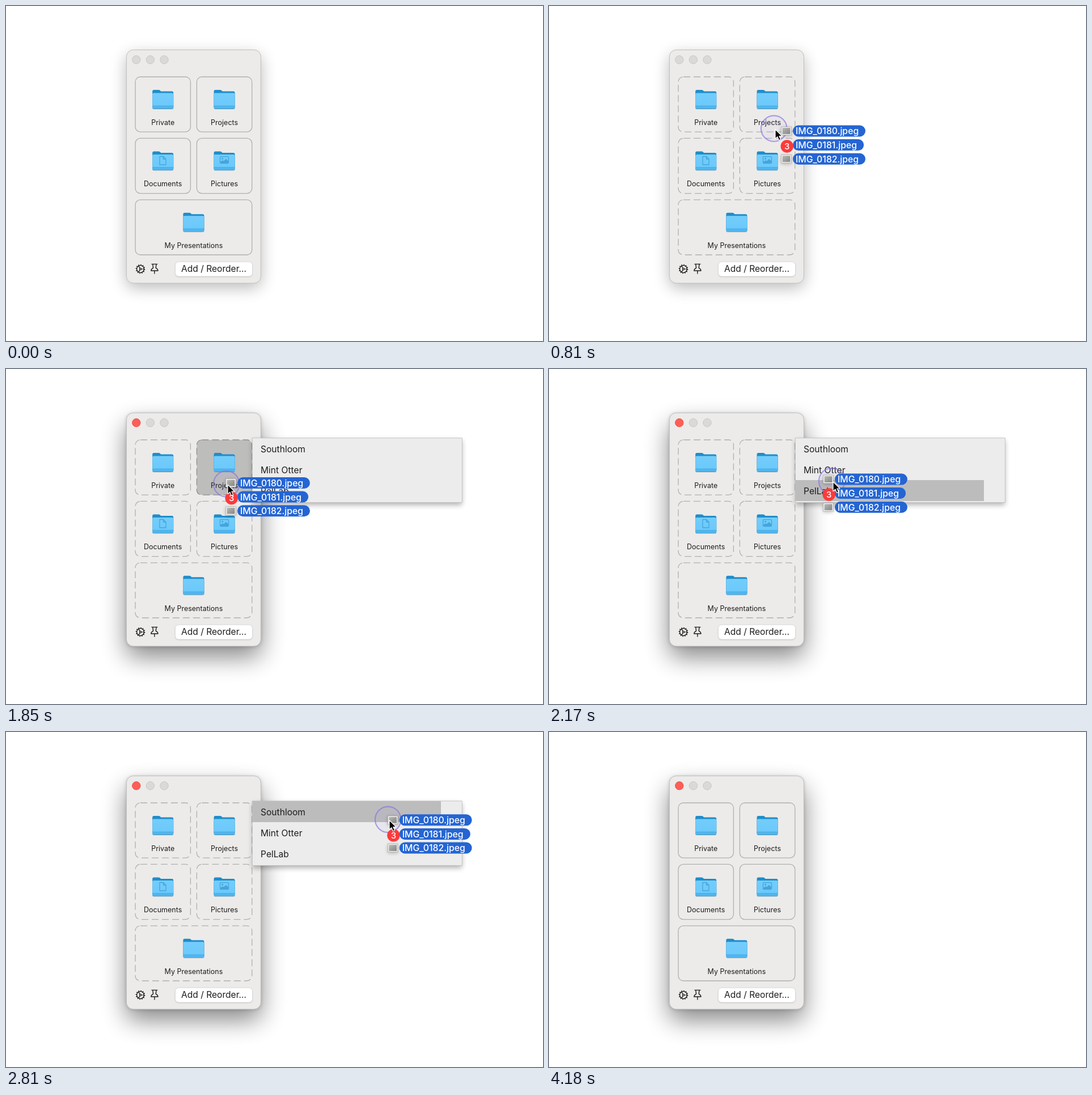
Recreate the animation shown at these times as an HTML page. Size 947 by 591 pixels, loop 7920 ms.

```html
<!DOCTYPE html>
<html lang="en">
<head>
<meta charset="utf-8">
<title>Drag files into a folder panel</title>
<style>
  html, body { margin: 0; width: 100%; height: 100%; overflow: hidden; background: #fff; }
  svg { display: block; width: 100%; height: 100%; }
  text { font-family: Inter, Roboto, "Liberation Sans", sans-serif; fill: #1d1d1d; }
  .cap { font-size: 12.5px; text-anchor: middle; }
  .row { font-size: 15.6px; }
  .file { font-size: 15.8px; font-weight: 500; fill: #fff; }
  .tile { fill: none; stroke: #b0b0af; stroke-width: 1.3; }
  .dashed .tile { stroke-dasharray: 12 6; }
  .line { fill: none; stroke: #1c1c1c; stroke-width: 1.4; stroke-linecap: round; stroke-linejoin: round; }
  .glyph { fill: none; stroke: #45a5da; stroke-width: 1.3; stroke-linejoin: round; }
  .blur-s { filter: blur(3px); }
  .blur-m { filter: blur(14px); }
  .blur-l { filter: blur(22px); }
</style>
</head>
<body>
<svg viewBox="0 0 947 591">
  <defs>
    <linearGradient id="front" x2="0" y2="1">
      <stop offset="0" stop-color="#74cdfb"/>
      <stop offset="1" stop-color="#69c8fb"/>
    </linearGradient>
    <linearGradient id="photo" x2="1" y2="1">
      <stop offset="0" stop-color="#b9b9b6"/>
      <stop offset="1" stop-color="#858583"/>
    </linearGradient>
    <g id="folder">
      <path d="M-18.5 14V-14Q-18.5-16.5-16-16.5H-7.5Q-6-16.5-5-15.5L-3.5-14H16Q18.5-14 18.5-11.5V14Z" fill="#1f8dca"/>
      <rect x="-18.5" y="-10" width="37" height="27.4" rx="2.5" fill="#5b8fac"/>
      <rect x="-18.5" y="-11" width="37" height="27.4" rx="2.5" fill="url(#front)"/>
      <path d="M-18.5 12H18.5V13.9Q18.5 16.4 16 16.4H-16Q-18.5 16.4-18.5 13.9Z" fill="#4fb6ef"/>
      <path d="M-18.5 11.7H18.5" stroke="#47a9df" stroke-width=".9"/>
    </g>
    <g id="thumb">
      <rect x="-9" y="-6" width="18" height="15" fill="#000" opacity=".25" class="blur-s"/>
      <rect x="-8.7" y="-7.2" width="17.4" height="14.4" fill="#fff" stroke="#9c9c9c" stroke-width=".7"/>
      <rect x="-7" y="-5.5" width="14" height="11" fill="url(#photo)"/>
    </g>
  </defs>

  <rect id="restShadow" class="blur-m" x="212" y="86" width="238" height="411" rx="14" opacity=".27"/>
  <g id="liveShadow">
    <rect class="blur-l" x="212" y="98" width="238" height="410" rx="14" opacity=".47"/>
    <rect class="blur-s" x="212" y="78" width="238" height="412" rx="12" opacity=".16"/>
  </g>
  <rect x="212.4" y="77.4" width="237" height="411.6" rx="12" fill="#ecebe9" stroke="#bebebd"/>

  <g fill="#dad9d8" stroke="#c4c3c2" stroke-width=".9">
    <circle id="close" cx="229.8" cy="94.8" r="7.2"/>
    <circle cx="254.4" cy="94.8" r="7.2"/>
    <circle cx="279" cy="94.8" r="7.2"/>
  </g>

  <g id="tiles"></g>

  <path class="glyph" d="M271 265.5H277.5L282 270V280H271ZM277.5 265.5V270H282"/>
  <rect class="glyph" x="377.5" y="265.6" width="15" height="12" rx="1.5"/>
  <circle cx="381.6" cy="269.2" r="1.5" fill="#45a5da"/>
  <path d="M378 277V275L382 272.2L384 273.6L388 269.8L392 273.5V277Z" fill="#45a5da"/>

  <g class="line" transform="translate(237 464)">
    <circle r="6.4"/>
    <circle r="7.5" stroke-width="1.7" stroke-dasharray="1.6 2.327" stroke-linecap="butt"/>
    <circle r="1.6" stroke-width="1.2"/>
    <path d="M1.7 0H6.2M-.8-1.4L-3.1-5.4M-.8 1.4L-3.1 5.4" stroke-width="1.2"/>
  </g>
  <path class="line" d="M257 455.4H266.8M258.8 455.6L259.6 462.2Q256 463.8 255.8 467H268Q267.8 463.8 264.2 462.2L265 455.6M261.9 467V472"/>

  <rect x="298.5" y="452" width="136" height="26" rx="6" opacity=".16" style="filter:blur(1px)"/>
  <rect x="298.5" y="451.3" width="136" height="25.6" rx="6" fill="#fff" stroke="#d5d5d4" stroke-width=".7"/>
  <text x="366.5" y="469" font-size="15.6" text-anchor="middle">Add / Reorder...</text>

  <g id="popup">
    <rect x="435" y="126" width="369" height="114" opacity=".3" style="filter:blur(5px)"/>
    <rect x="434.3" y="121.8" width="370" height="113.6" fill="#ececec" stroke="#bdbdbd" stroke-width=".8"/>
    <rect id="hover" x="434.3" width="332.7" height="37" fill="#bcbcbc"/>
    <text class="row" x="449" y="146.5">Southloom</text>
    <text class="row" x="449" y="183.5">Mint Otter</text>
    <text class="row" x="449" y="220.5">PelLab</text>
  </g>

  <circle id="press" r="22.8" fill="#8d7be8" fill-opacity=".05" stroke="#8672e0" stroke-opacity=".65" stroke-width="2.2"/>
  <g id="files"></g>
  <path id="cursor" d="M0 0V16.6L3.8 13.1L6.6 19.4L9.6 18.1L6.9 12H12Z" fill="#000" stroke="#fff" stroke-width="1.2" stroke-linejoin="round"/>
</svg>
<script>
const LOOP = 7920, STEP = 80;
const MOVE = 330, DROP = 3380;
const el = id => document.getElementById(id);

// label, x, y, width
const tiles = [
  ["Private", 228, 125, 97.4],
  ["Projects", 336.4, 125, 97.4],
  ["Documents", 228, 233.4, 97.4],
  ["Pictures", 336.4, 233.4, 97.4],
  ["My Presentations", 228, 341.8, 205.8]
];
el("tiles").innerHTML = tiles.map(([name, x, y, w]) => `
  <rect class="tile" x="${x}" y="${y}" width="${w}" height="97.2" rx="9"/>
  <use href="#folder" x="${x + w / 2}" y="${y + 39.5}"/>
  <text class="cap" x="${x + w / 2}" y="${y + 85}">${name}</text>`).join("");
const projects = document.querySelectorAll(".tile")[1];

el("files").innerHTML = [0, 1, 2].map(i => `
  ${i === 1 ? "" : `<use href="#thumb" x="-11.5" y="${i * 24.6}"/>`}
  <rect y="${i * 24.6 - 10}" width="${i === 1 ? 125.2 : 128}" height="20" rx="10" fill="#2465d3"/>
  <text class="file" x="5" y="${i * 24.6 + 5.9}">IMG_018${i}.jpeg</text>`).join("") + `
  <circle cx="-10.3" cy="27" r="11.2" fill="#fb3b3c"/>
  <text class="file" x="-10.3" y="32.4" font-weight="600" style="font-size:15px" text-anchor="middle">3</text>`;

// time, pointer x, y, dragged files x, y (the files trail the pointer)
const path = [
  [330, 785, 300, 818, 303],
  [490, 645, 272, 682, 275],
  [650, 505, 242, 541, 245],
  [810, 399, 217.5, 430, 220.5],
  [890, 381, 206, 403, 205],
  [970, 376, 201, 394.5, 198],
  [1370, 376, 201, 394.5, 198],
  [1610, 378, 201, 396, 198],
  [1850, 391, 204, 408, 201],
  [1930, 406, 205, 420, 202],
  [2090, 464, 203, 468, 198],
  [2250, 538, 195, 540, 191],
  [2490, 635, 172, 638.7, 170.5],
  [2650, 666, 161, 679, 160],
  [2890, 681, 153, 701, 153],
  [3050, 688, 152, 707, 148],
  [3540, 688, 152, 707, 148],
  [3700, 712, 166, 707, 148],
  [3860, 790, 212, 707, 148],
  [4100, 936, 295, 707, 148]
];

function sample(t) {
  const last = path.length - 1;
  if (t >= path[last][0]) return path[last];
  const i = Math.max(1, path.findIndex(p => p[0] > t));
  const a = path[i - 1], b = path[i];
  const k = Math.max(0, (t - a[0]) / (b[0] - a[0]));
  return a.map((v, n) => v + (b[n] - v) * k);
}

function snap(t) {
  if (t < MOVE) return 0;
  const from = t < DROP ? MOVE : DROP;
  return from + Math.floor((t - from) / STEP) * STEP;
}

const show = (id, on) => { el(id).style.display = on ? "" : "none"; };
const place = (id, x, y) => el(id).setAttribute("transform", `translate(${x} ${y})`);

function draw(time) {
  const t = snap(time);
  const [, x, y, fx, fy] = sample(t);
  const within = (from, to) => t >= from && t < to;
  const dragging = within(MOVE, 3460);
  const active = t >= 1530;
  const open = within(1530, 3540);

  show("restShadow", !active);
  show("liveShadow", active);
  el("close").setAttribute("fill", active ? "#fe5e56" : "#dad9d8");
  el("close").setAttribute("stroke", active ? "#e24b42" : "#c4c3c2");

  el("tiles").classList.toggle("dashed", within(730, 3540));
  const overTile = within(890, 2170) && x < 434;
  projects.style.fill = overTile ? "#bdbdbb" : "none";
  projects.style.stroke = overTile ? "#8e8e8d" : "";

  show("popup", open);
  show("hover", dragging && x > 434);
  const row = Math.min(2, Math.max(0, Math.floor((y - 122) / 37)));
  el("hover").setAttribute("y", 122 + row * 37);

  show("press", dragging);
  show("files", dragging);
  show("cursor", within(MOVE, 4180));
  place("press", x - 2.3, y - 1.3);
  place("files", fx, fy);
  place("cursor", x, y);
}

const start = performance.now();
function tick() {
  draw((performance.now() - start) % LOOP);
  requestAnimationFrame(tick);
}
tick();
</script>
</body>
</html>
```
